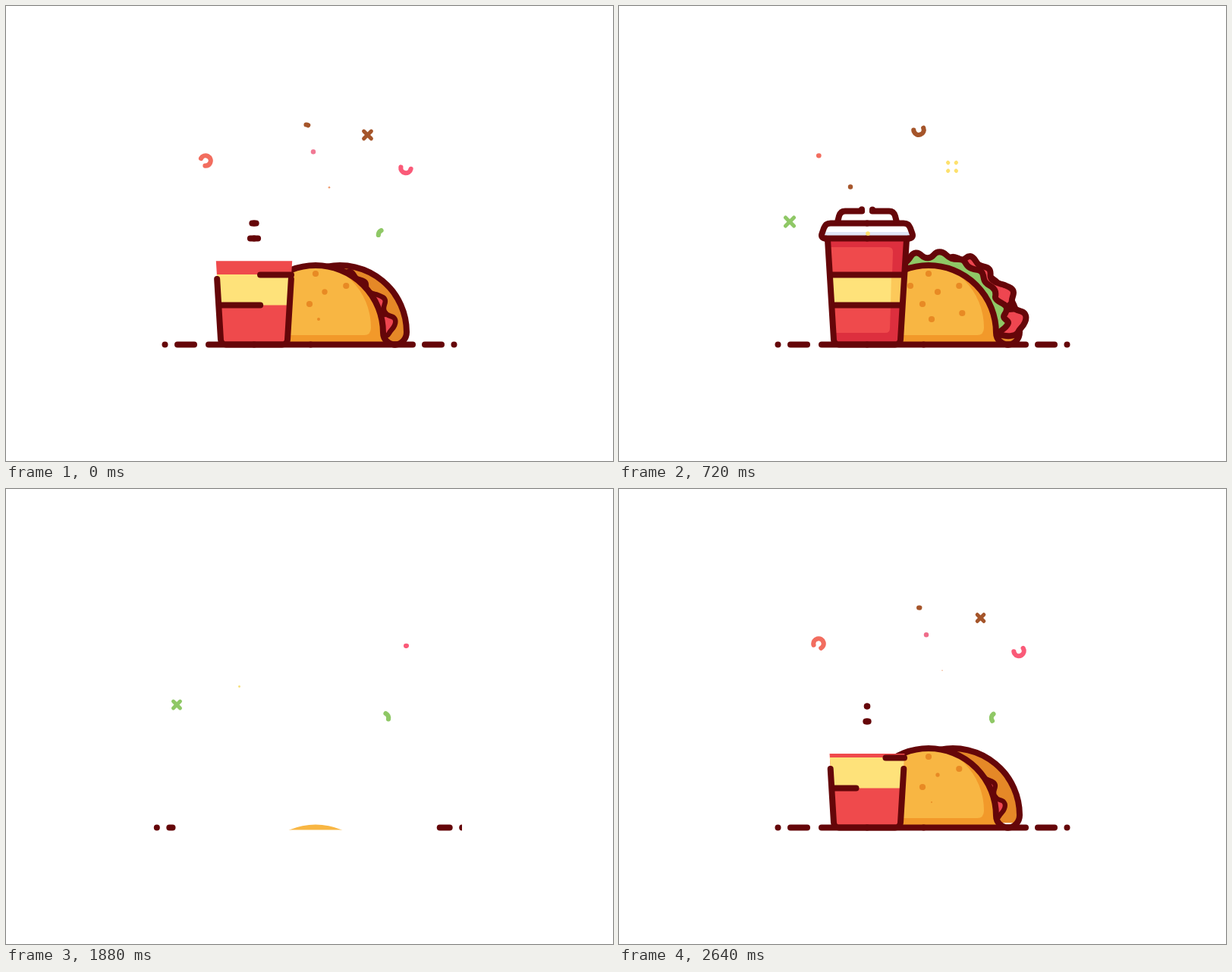
Write an HTML page that moves like this. It is 800 by 600 pixels and loops after 2.68 s.

```html
<!DOCTYPE html>
<html lang="en">
<head>
<meta charset="utf-8">
<title>Taco and drink</title>
<style>
@property --t { syntax: '<number>'; inherits: true; initial-value: 0; }
@keyframes clock { to { --t: 2680; } }

html, body { margin: 0; width: 100%; height: 100%; overflow: hidden; background: #fff; }
svg { display: block; width: 800px; height: 600px; animation: clock 2680ms steps(67) -965ms infinite; }

/* --s start, --d duration, --u linear progress, --e eased progress */
.e {
  --u: clamp(0, (var(--t) - var(--s)) / var(--d), 1);
  --e: calc(var(--u) * var(--u) * (3 - 2 * var(--u)));
}
.lin { --e: var(--u); }

.ink, .draw { fill: none; stroke: #650609; stroke-width: 8; stroke-linecap: round; stroke-linejoin: round; }
.draw, .reveal {
  stroke-dasharray: 1px, 2px;
  stroke-dashoffset: calc(1px * (1 - var(--e)));
  opacity: clamp(0, var(--u) * 9999, 1);
}
.reveal { fill: none; stroke: #fff; stroke-width: 60; }
.fade { opacity: calc(1 * var(--e)); }

.left { transform: translateX(calc(-16.5px * (1 - var(--e)))); }
.right { transform: translateX(calc(16.5px * (1 - var(--e)))); }
.rise { transform: translateY(calc(107px * (1 - var(--e)))); }
.pour { transform: translateY(calc(140px * (1 - var(--e)))); }
.stuff {
  transform: translate(408px, 440px) scale(calc(.64 + .36 * var(--e))) translate(-408px, -440px);
  opacity: clamp(0, var(--u) * 9999, 1);
}
.spot { --d: 200; fill: #e88a24; r: calc(4.1px * var(--e)); }

.curl {
  --d: 1200;
  --a: clamp(0, (var(--t) - var(--s)) / 780, 1);
  --b: clamp(0, (var(--t) - var(--s) - 450) / 750, 1);
  --head: calc(var(--a) * (1 + var(--a) * (3 - 2 * var(--a))) / 2);
  --tail: calc(var(--b) * var(--b) * (3 - 2 * var(--b)));
  fill: none; stroke-width: 6.2; stroke-linecap: round;
  stroke-dasharray: max(.1px, 360px * (var(--head) - var(--tail))), 999px;
  transform: translate(var(--x), var(--y)) rotate(calc(360deg * (var(--e) + var(--tail)) - 90deg));
  opacity: clamp(0, var(--u) * (1 - var(--u)) * 99999, 1);
}
.cross {
  --d: 600;
  --a: clamp(0, (var(--t) - var(--s)) / 300, 1);
  --b: clamp(0, (var(--t) - var(--s) - 260) / 330, 1);
  --out: calc(var(--a) * (2 - var(--a)));
  --in: calc(var(--b) * var(--b) * (3 - 2 * var(--b)));
  fill: none; stroke-width: 5; stroke-linecap: round;
  stroke-dasharray: max(.01px, 1px * (var(--out) - var(--in))), 9px;
  stroke-dashoffset: calc(-1px * var(--in));
  opacity: clamp(0, var(--u) * (1 - var(--u)) * 99999, 1);
}
.dot {
  --d: 350;
  --f: clamp(0, (var(--t) - var(--s) - 300) / 350, 1);
  r: calc(3.2px * var(--u) * (2 - var(--u)));
  opacity: calc(1 - var(--f) * var(--f));
}
</style>
</head>
<body>
<svg viewBox="0 0 800 600">
  <defs>
    <clipPath id="stage"><rect width="601" height="600"/></clipPath>
    <clipPath id="floor"><rect width="800" height="449.5"/></clipPath>
    <clipPath id="shell"><path d="M319.5 447V431A88.5 88.5 0 0 1 496.5 431Q497 442 505 447Z"/></clipPath>
    <clipPath id="level"><rect class="e pour" style="--s:552;--d:583" x="260" y="306" width="140" height="141"/></clipPath>
    <clipPath id="body"><path d="M275 306H379L371 440Q371 446 364 446H290Q283 446 283 440Z"/></clipPath>
    <mask id="sweep" maskUnits="userSpaceOnUse" x="0" y="0" width="800" height="600">
      <path class="e reveal" style="--s:465;--d:520" pathLength="1" d="M424 342.5A88 88 0 0 1 512 430.5V447"/>
    </mask>
  </defs>

  <!-- back of the taco -->
  <path mask="url(#sweep)" fill="#e58827" d="M424 343.5A88 88 0 0 1 528 430A15.5 16 0 0 1 497 430A89 89 0 0 0 424 343.5Z"/>
  <path class="e draw" style="--s:400;--d:400" pathLength="1" d="M423.5 343.6A88 88 0 0 1 528 430A15.5 16.5 0 0 1 512.5 446.5"/>

  <!-- filling -->
  <g class="e stuff" style="--s:650;--d:620">
    <path class="ink" style="fill:#ee4650" d="M432 336C438 328 444 331 450 334S457 329 463 330S470 338 474 341S487 343 489 349S487 357 493 362S503 366 508 368S520 372 520 378S515 388 519 395S526 401 531 403S538 410 535 417S529 424 526 430S510 437 499 432L440 400Z"/>
    <path fill="#650609" d="M508 395L518 386L527 403L514 404Z"/>
    <path class="ink" style="fill:#8fc866" d="M366 352C374 340 380 338 384 331S394 324 399 329S411 333 415 328S426 323 431 328S440 334 447 334S455 336 458 341S467 347 473 348S480 354 481 360S488 368 492 371S497 378 496 383S504 391 508 394S512 401 508 407S514 414 513 418S505 428 499 431L440 400Z"/>
  </g>

  <!-- front of the taco -->
  <g clip-path="url(#floor)">
    <g class="e rise" style="--s:60;--d:640">
      <g clip-path="url(#shell)">
        <path fill="#f8b643" d="M300 330H520V450H300Z"/>
        <path class="e fade" style="--s:680;--d:200" fill="#f2992a" fill-rule="evenodd" d="M300 330H520V450H300ZM300 434H472Q481 434 481 424A88 88 0 0 0 393 336H300Z"/>
      </g>
      <g id="spots"></g>
    </g>
  </g>
  <path class="e draw" style="--s:480;--d:500" pathLength="1" d="M513 446.5A16 15.5 0 0 1 497 431A89 89 0 0 0 319 431V446"/>

  <!-- cup -->
  <g clip-path="url(#level)">
    <g clip-path="url(#body)">
      <path fill="#ef4a4c" d="M270 306H384V447H270Z"/>
      <path fill="#fee27a" d="M270 354H384V394.5H270Z"/>
      <g class="e fade" style="--s:1050;--d:250">
        <path fill="#dd2f3e" fill-rule="evenodd" d="M270 306H384V354H270ZM270 318H355Q361 318 361 324L360 354H270ZM270 394.5H384V447H270ZM270 394.5H358L357 425Q357 431 351 431H270Z"/>
        <path fill="#fcc95a" d="M359 354H384V394.5H358Z"/>
      </g>
    </g>
  </g>
  <path class="e draw" style="--s:810;--d:335" pathLength="1" d="M376 354.5H279"/>
  <path class="e draw" style="--s:830;--d:235" pathLength="1" d="M283 394.5H373"/>
  <path id="side" class="e lin draw" style="--s:392;--d:800" pathLength="1" d="M327 446.5H290Q283.5 446.5 283 440L275 308"/>
  <use href="#side" transform="matrix(-1 0 0 1 654 0)"/>

  <!-- lid -->
  <path class="e fade" style="--s:1500;--d:300" fill="#cfd8f0" d="M270 298H384V303H270Z"/>
  <g id="lid">
    <path class="e draw" style="--s:870;--d:480" pathLength="1" d="M327 306.5H272"/>
    <path class="e draw" style="--s:900;--d:540" pathLength="1" d="M327 286.5H279C273 286.5 272 289 270 293L267.5 300C266 304 268 306.5 272 306.5"/>
    <path class="e draw" style="--s:1360;--d:420" pathLength="1" d="M288 285L290 277Q292 270.5 298 270.5H327"/>
  </g>
  <use href="#lid" transform="matrix(-1 0 0 1 654 0)"/>

  <!-- straw -->
  <path class="e draw" style="--s:1640;--d:480" pathLength="1" d="M320 270V228Q320 222 324 218L343 198L348 203"/>
  <path class="e draw" style="--s:1640;--d:480" pathLength="1" d="M334 270V233Q334 229 337 226L353 208L348 203"/>

  <!-- ground -->
  <g clip-path="url(#stage)">
    <g class="e left" style="--s:0;--d:400">
      <path class="ink" d="M209.5 446.5h.01"/>
      <path class="e draw" style="--s:90;--d:250" pathLength="1" d="M226 446.5H248"/>
    </g>
    <g class="e right" style="--s:0;--d:400">
      <path class="ink" d="M590.5 446.5h.01"/>
      <path class="e draw" style="--s:20;--d:250" pathLength="1" d="M574 446.5H552"/>
    </g>
    <path class="e draw" style="--s:230;--d:380" pathLength="1" d="M267 446.5H401.5"/>
    <path class="e draw" style="--s:230;--d:380" pathLength="1" d="M536 446.5H401.5"/>
  </g>

  <g id="confetti"></g>
</svg>
<script>
const put = (id, list, make) =>
  document.getElementById(id).insertAdjacentHTML('beforeend', list.map(p => make(...p)).join(''));

// x, y, start
put('spots', [
  [360, 369, 440], [448.3, 369, 440], [400, 393, 560], [348, 413, 620], [408, 353, 700],
  [420, 377, 800], [412, 413, 860], [384, 369, 940], [452.3, 405, 1000]
], (x, y, s) => `<circle class="e spot" cx="${x}" cy="${y}" style="--s:${s}"/>`);

// x, y, colour, start
put('confetti', [
  [395, 163.2, '#a5552a', 880], [395, 163.2, '#a5552a', 2260],
  [263, 204, '#f26d5f', 280], [263, 204, '#f26d5f', 1660],
  [527, 213.5, '#fa5a78', 130], [497.5, 302, '#8fc866', -40]
], (x, y, c, s) =>
  `<circle class="e curl" r="6.7" pathLength="360" stroke="${c}" style="--x:${x}px;--y:${y}px;--s:${s}"/>`);

put('confetti', [
  [476.5, 170, '#a5552a', 760], [476.5, 170, '#a5552a', 2140],
  [439, 212, '#fde16d', 1140], [439, 212, '#fde16d', 2520],
  [225, 284.5, '#8fc866', -10], [225, 284.5, '#8fc866', 1370]
], (x, y, c, s) => [0, 90, 180, 270].map(a =>
  `<g transform="translate(${x} ${y}) rotate(${a})"><path class="e cross" pathLength="1" d="M0 0L5.5 5.5" stroke="${c}" style="--s:${s}"/></g>`
).join(''));

put('confetti', [
  [307.5, 260.5, '#f7e07a', 70], [405, 192.3, '#ee5f80', 520], [426, 239.3, '#f09a6c', 880],
  [305, 238.5, '#a5552a', 1350], [328, 300, '#fde16d', 1450], [487.5, 304.7, '#ee5580', 1820],
  [463, 283, '#a05a44', 2130], [510.3, 298.5, '#d9963c', 2500]
], (x, y, c, s) => `<circle class="e dot" cx="${x}" cy="${y}" fill="${c}" style="--s:${s}"/>`);
</script>
</body>
</html>
```
